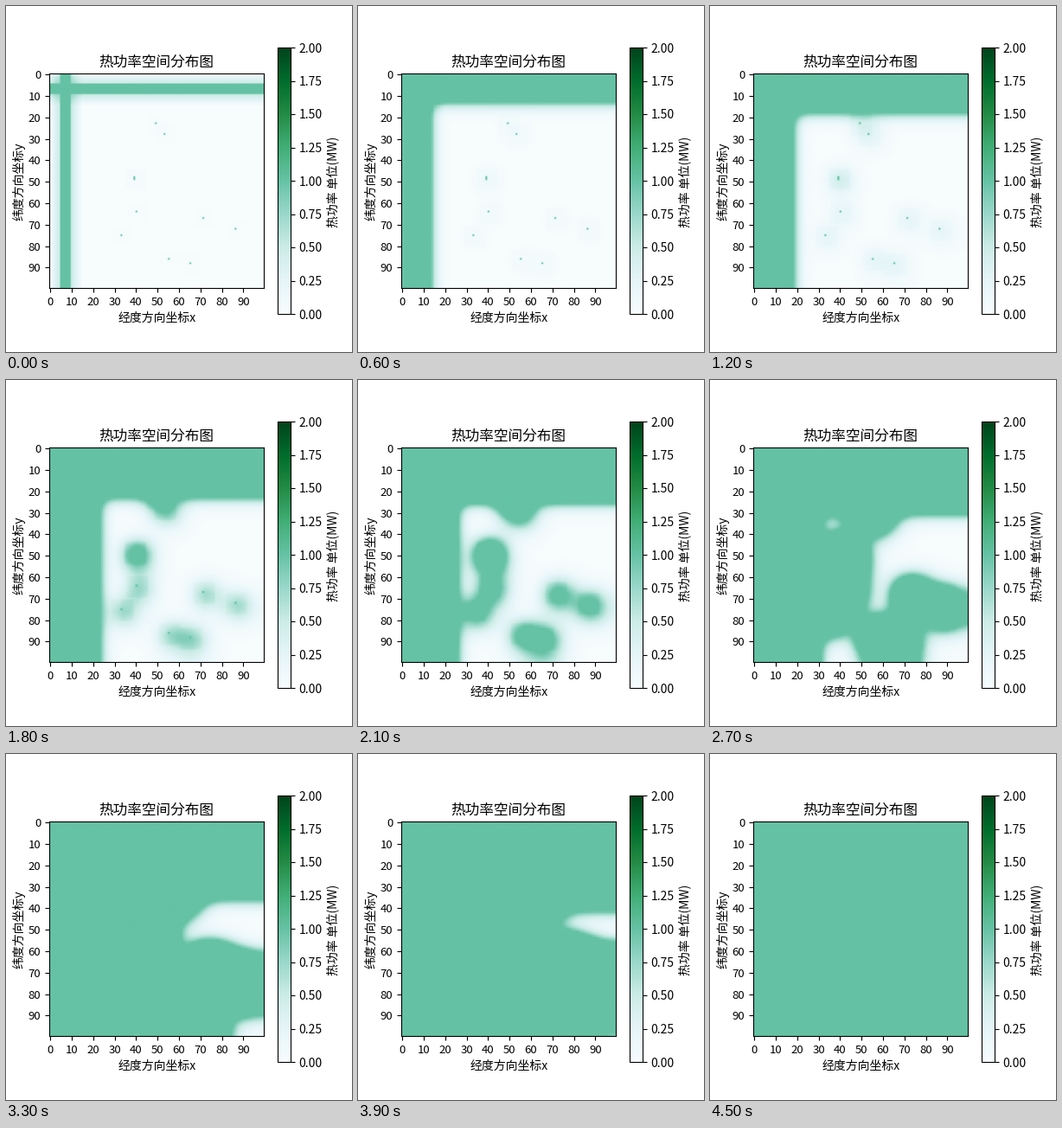
Animation, 400 px wide and 400 px high, one loop 8000 ms. Source, as a matplotlib script:

```python
import matplotlib.pyplot as plt
import numpy as np
from matplotlib.animation import FuncAnimation

plt.rcParams["font.family"] = ["Noto Sans CJK JP", "DejaVu Sans"]

SIZE = 100
STEPS = 16
STEP_MS, TICK_MS, LOOP_MS = 300, 100, 8000
SPOTS = [(49, 23), (53, 28), (39, 48), (39, 49), (40, 64),
         (33, 75), (71, 67), (86, 72), (55, 86), (65, 88)]


def window_mean(size, before=5, after=5):
    """Matrix averaging each cell over [i - before, i + after), cut at the edges."""
    matrix = np.zeros((size, size))
    for i in range(size):
        lo, hi = max(0, i - before), min(size, i + after)
        matrix[i, lo:hi] = 1 / (hi - lo)
    return matrix


def initial_power():
    power = np.zeros((SIZE, SIZE))
    power[5:10, :] = 1
    power[:, 5:10] = 1
    for x, y in SPOTS:
        power[y, x] = 1
    return power


def simulate():
    """Every cell gains its neighbourhood mean until it saturates at 1 MW."""
    mean = window_mean(SIZE)
    power, states = initial_power(), []
    for _ in range(STEPS):
        power = np.minimum(1, power + mean @ power @ mean.T)
        states.append(power)
    return states


def label(x, y, text, rotation=0):
    """Centre a text on a pixel position measured from the top left."""
    fig.text(x / 400, 1 - y / 400, text, fontsize=10, rotation=rotation,
             ha="center", va="center")


states = simulate()

fig, ax = plt.subplots(figsize=(4, 4), dpi=100)
image = ax.imshow(states[0], cmap="BuGn", vmin=0, vmax=2)
bar = fig.colorbar(image, ax=ax, ticks=np.arange(0, 2.01, 0.25), format="%.2f")
bar.ax.tick_params(labelsize=10)
ax.set_xticks(range(0, SIZE, 10))
ax.set_yticks(range(0, SIZE, 10))
ax.tick_params(labelsize=9.5)
ax.set_title("热功率空间分布图", fontsize=12)
label(174.5, 360.5, "经度方向坐标x")
label(15, 202.5, "纬度方向坐标y", rotation=90)
label(377.5, 203, "热功率 单位(MW)", rotation=90)


def update(frame):
    step = min(frame * TICK_MS // STEP_MS, STEPS - 1)
    image.set_data(states[step])
    return [image]


animation = FuncAnimation(fig, update, frames=LOOP_MS // TICK_MS,
                          interval=TICK_MS, repeat=True, repeat_delay=0)
plt.show()
```
